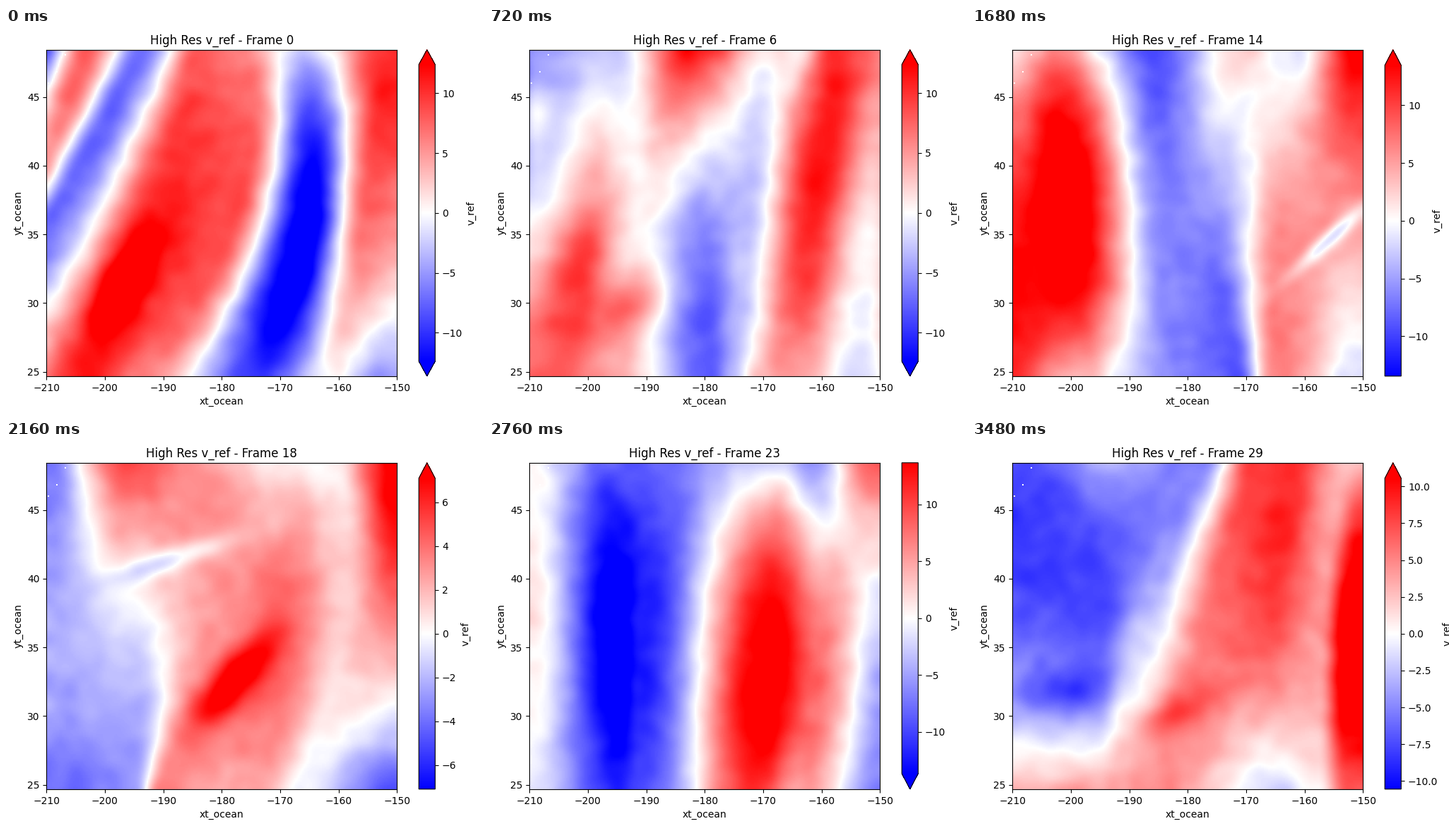
A matplotlib script for the animation above (3600 ms loop, 675 px wide and 545 px high).

```python
import numpy as np
import matplotlib.pyplot as plt
from matplotlib.animation import FuncAnimation
from matplotlib.colors import Normalize

W, H, DPI = 675, 545, 100
LEFT, TOP, WIDE, HIGH = 57, 30, 496, 462
CELL = 2
FRAMES, STEP = 30, 120
DRIFT = 10  # cells per step, eastward

px = np.arange(LEFT, LEFT + WIDE, CELL) + CELL / 2
py = np.arange(TOP, TOP + HIGH, CELL) + CELL / 2
gx, gy = np.meshgrid(px, py)


def blur(a, passes):
    for _ in range(passes):
        p = np.pad(a, 1, mode="edge")
        p = (p[:-2] + 2 * p[1:-1] + p[2:]) / 4
        a = (p[:, :-2] + 2 * p[:, 1:-1] + p[:, 2:]) / 4
    return a


def curve(v):
    """Parabola through values at the top, middle and bottom of the map."""
    t = ((py - TOP) / HIGH)[:, None]
    top, mid, low = v.T
    return (top * (2 * t - 1) * (t - 1) + mid * 4 * t * (1 - t)
            + low * t * (2 * t - 1))


def profile(x, v):
    """Smooth steps from one band's strength to the next."""
    at = np.interp(px, x, np.arange(len(x)))
    i = np.minimum(at.astype(int), len(x) - 2)
    f = at - i
    return v[i] + (v[i + 1] - v[i]) * f * f * (3 - 2 * f)


def blob(x, y, rx, ry, tilt, amp):
    c, s = np.cos(np.radians(tilt)), np.sin(np.radians(tilt))
    dx, dy = gx - x, gy - y
    u, v = (c * dx + s * dy) / rx, (c * dy - s * dx) / ry
    return amp * np.exp(-u * u - v * v)


keys = []


def key(step, vmax, extend, bands, blobs=()):
    """Each band: x, then strength, at the top, middle and bottom."""
    b = np.array(bands, float)
    xs = np.maximum.accumulate(curve(b[:, :3]), axis=1)
    vs = curve(b[:, 3:])
    field = np.array([profile(x, v) for x, v in zip(xs, vs)])
    for args in blobs:
        field += blob(*args)
    grain = blur(np.random.default_rng(step).normal(size=field.shape), 45)
    field = blur(field, 8) + 0.25 * grain / grain.std()
    keys.append((step, vmax, extend, field / 10))


key(0, 12.39, "both", [
    (50, -80, -200, -8, -8, 0),
    (112, 20, -120, 7, 3, 0),
    (195, 68, -60, -6, -6, -4),
    (270, 212, 115, 6, 9, 9),
    (335, 322, 190, 5, 7, 5),
    (420, 428, 358, -2, -12, -8),
    (540, 510, 470, 9, 6, 0),
    (620, 600, 525, 8, 4, -4),
], [(165, 360, 75, 28, -60, 6)])

key(3, 12.48, "max", [
    (110, 110, 110, -8, -5, 4),
    (238, 240, 262, 14, 0, -3),
    (375, 310, 285, -2, 0, -1),
    (432, 398, 325, 10, 8, 6),
    (500, 480, 468, 5, -3.5, -5),
    (553, 545, 550, 6, 5, 6),
], [(140, 392, 75, 42, -25, 6)])

key(9, 12.28, "both", [
    (62, 62, 50, -13, -5, 0),
    (125, 130, 100, 2, 5, 4),
    (225, 205, 165, 4, 11, 5),
    (290, 275, 215, 3, 4, 2),
    (385, 365, 375, -2, -6, -6),
    (440, 420, 420, -2, -3.5, -3),
    (470, 520, 530, 2, 5, 4),
], [(180, 335, 75, 32, -55, 4), (125, 115, 25, 40, 0, 4)])

key(14, 13.45, "max", [
    (57, 57, 57, 1, 9, 8),
    (115, 135, 130, 4.5, 13, 3),
    (262, 275, 290, -7, -5, -5),
    (380, 345, 380, 2, -4, -7),
    (460, 440, 425, -1.5, 4, 5),
    (545, 540, 553, 11, 4, -1),
], [(508, 296, 75, 10, -43, -5.5)])

key(18, 7.09, "max", [
    (57, 70, 90, -6, -3, -6),
    (165, 180, 185, 7.5, -1, -4),
    (240, 290, 215, 5, 4, 5),
    (400, 390, 360, .5, 6, 3),
    (470, 480, 420, .5, 2, -1),
    (545, 550, 545, 11, 5, -7),
], [(320, 340, 80, 28, -48, 8), (240, 165, 100, 15, -18, -4)])

key(23, 13.65, "min", [
    (57, 57, 57, 0, 1, -1),
    (170, 185, 185, -6, -12, -8),
    (235, 215, 215, -6, -9, -7),
    (400, 402, 375, -1.5, 11, 8),
    (462, 470, 440, -4.5, 5, 4),
    (532, 560, 560, 6, -2, -5),
])

key(29, 10.55, "max", [
    (80, 100, 80, -7, -6.5, 3),
    (200, 180, 180, -3, -7, 4),
    (325, 240, 215, -5, -2.5, 4),
    (400, 340, 270, 8, 5.5, 4.5),
    (465, 420, 430, 8, 7, -2),
    (525, 495, 490, 2, 4, 0),
    (560, 535, 530, 3, 13, 6),
], [(130, 355, 60, 32, -10, -4), (285, 385, 65, 25, -25, 3)])


def shifted(field, cells):
    cols = np.arange(field.shape[1]) - int(round(cells))
    return field[:, np.clip(cols, 0, field.shape[1] - 1)]


def state(n):
    """Range, bar ends and field at step n, drifting between key states."""
    k = max(i for i in range(len(keys) - 1) if keys[i][0] <= n)
    (n0, v0, e0, f0), (n1, v1, e1, f1) = keys[k:k + 2]
    w = (n - n0) / (n1 - n0)
    mix = ((1 - w) * shifted(f0, DRIFT * (n - n0))
           + w * shifted(f1, DRIFT * (n - n1)))
    mix /= np.hypot(w, 1 - w)
    vmax = (1 - w) * v0 + w * v1
    field = mix * vmax
    for x, y in ((83, 37), (72, 60), (59, 77)):  # small islands
        field[(y - TOP) // CELL, (x - LEFT) // CELL] = np.nan
    return vmax, e0 if w < 0.5 else e1, field


def box(x, width):
    return [(x + 0.2) / W, (H - TOP - HIGH - 0.8) / H, width / W, HIGH / H]


fig = plt.figure(figsize=(W / DPI, H / DPI), dpi=DPI)
ax = fig.add_axes(box(LEFT, WIDE))
im = ax.imshow(np.zeros_like(gx), cmap="bwr", aspect="auto",
               interpolation="nearest", extent=(-210, -150, 24.69, 48.43))
ax.set_xticks(range(-210, -149, 10))
ax.set_yticks(range(25, 46, 5))
ax.set_xlabel("xt_ocean")
ax.set_ylabel("yt_ocean")


def draw(n):
    vmax, extend, field = state(n)
    im.set_data(field)
    im.set_clim(-vmax, vmax)
    ax.set_title(f"High Res v_ref - Frame {n}")
    for old in fig.axes[1:]:
        old.remove()
    scale = plt.cm.ScalarMappable(Normalize(-vmax, vmax), "bwr")
    bar = fig.colorbar(scale, cax=fig.add_axes(box(584, 23.1)), extend=extend)
    bar.set_label("v_ref")
    return []


anim = FuncAnimation(fig, draw, frames=FRAMES, interval=STEP,
                     init_func=lambda: [], repeat=True, repeat_delay=0)
plt.show()
```
